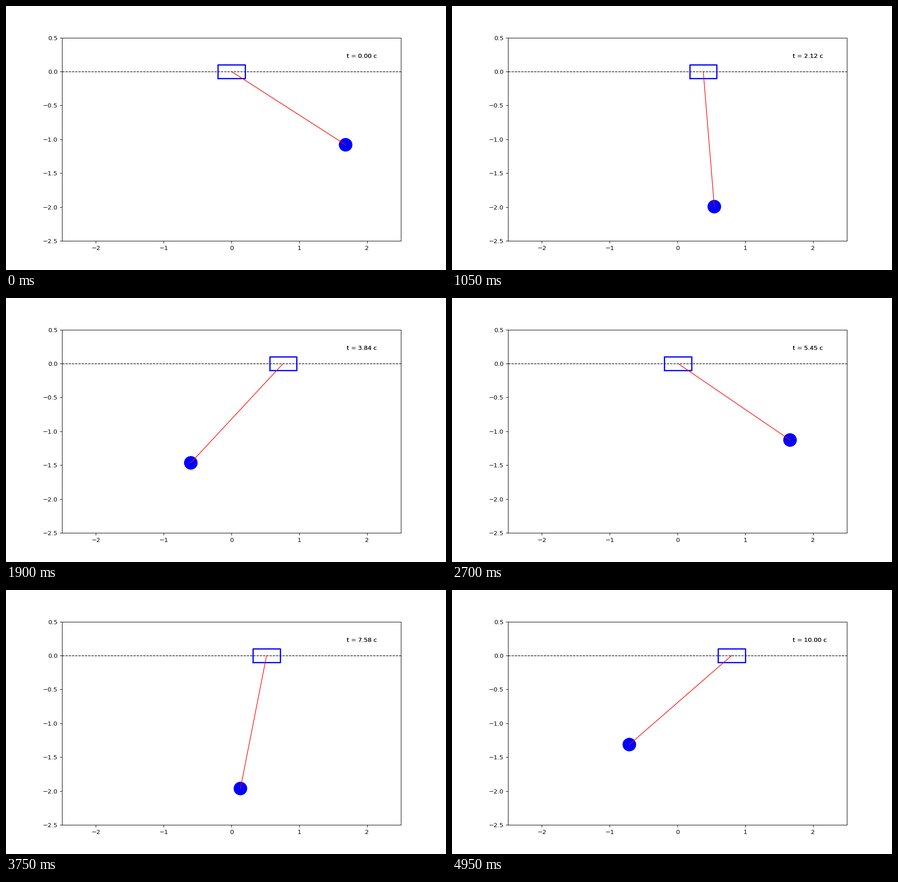
Write a matplotlib script that moves like this. It is 966 by 580 pixels and loops after 5 s.

```python
import numpy as np
import matplotlib.pyplot as plt
from matplotlib.animation import FuncAnimation
from matplotlib.patches import Circle

G = 9.81
LENGTH = 2.0
MASS_RATIO = 0.25  # bob mass / total mass
START_ANGLE = 1.0
FRAMES = 100
SUBSTEPS = 20
TIMES = np.linspace(0, 10, FRAMES)


def derivative(state):
    """Pendulum hanging from a cart that slides without friction."""
    angle, speed = state
    s, c = np.sin(angle), np.cos(angle)
    accel = -(G / LENGTH * s + MASS_RATIO * speed**2 * s * c) / (1 - MASS_RATIO * c**2)
    return np.array([speed, accel])


def rk4_step(state, dt):
    k1 = derivative(state)
    k2 = derivative(state + dt / 2 * k1)
    k3 = derivative(state + dt / 2 * k2)
    k4 = derivative(state + dt * k3)
    return state + dt / 6 * (k1 + 2 * k2 + 2 * k3 + k4)


def solve_angles():
    state = np.array([START_ANGLE, 0.0])
    dt = (TIMES[1] - TIMES[0]) / SUBSTEPS
    angles = [state[0]]
    for _ in range(FRAMES - 1):
        for _ in range(SUBSTEPS):
            state = rk4_step(state, dt)
        angles.append(state[0])
    return np.array(angles)


angles = solve_angles()
# The centre of mass keeps its horizontal place.
cart_x = MASS_RATIO * LENGTH * (np.sin(START_ANGLE) - np.sin(angles))
bob_x = cart_x + LENGTH * np.sin(angles)
bob_y = -LENGTH * np.cos(angles)

plt.rcParams["font.family"] = "DejaVu Sans"
fig, ax = plt.subplots(figsize=(10, 6.00415), dpi=96.6)
ax.set_aspect("equal")
ax.set(xlim=(-2.5, 2.5), ylim=(-2.5, 0.5))
ax.set_xticks(range(-2, 3))
ax.set_yticks(np.arange(-2.5, 0.6, 0.5))

ax.plot([-2.5, 2.5], [0, 0], "k--", lw=1)
cart, = ax.plot([], [], color="blue", lw=2)
rod, = ax.plot([], [], color="red", lw=1)
bob = ax.add_patch(Circle((0, 0), 0.1, facecolor="blue", edgecolor="none"))
# Two stacked copies make the clock slightly heavier than the tick labels.
clocks = [ax.text(1.7, 0.2, "") for _ in range(2)]

CART_DX = np.array([-0.2, 0.2, 0.2, -0.2, -0.2])
CART_Y = np.array([-0.1, -0.1, 0.1, 0.1, -0.1])


def update(i):
    cart.set_data(cart_x[i] + CART_DX, CART_Y)
    rod.set_data([cart_x[i], bob_x[i]], [0, bob_y[i]])
    bob.center = bob_x[i], bob_y[i]
    for clock in clocks:
        clock.set_text(f"t = {TIMES[i]:.2f} c")
    return [cart, rod, bob, *clocks]


anim = FuncAnimation(fig, update, frames=FRAMES, init_func=lambda: update(0),
                     interval=50, repeat=True, repeat_delay=0)
plt.show()
```
